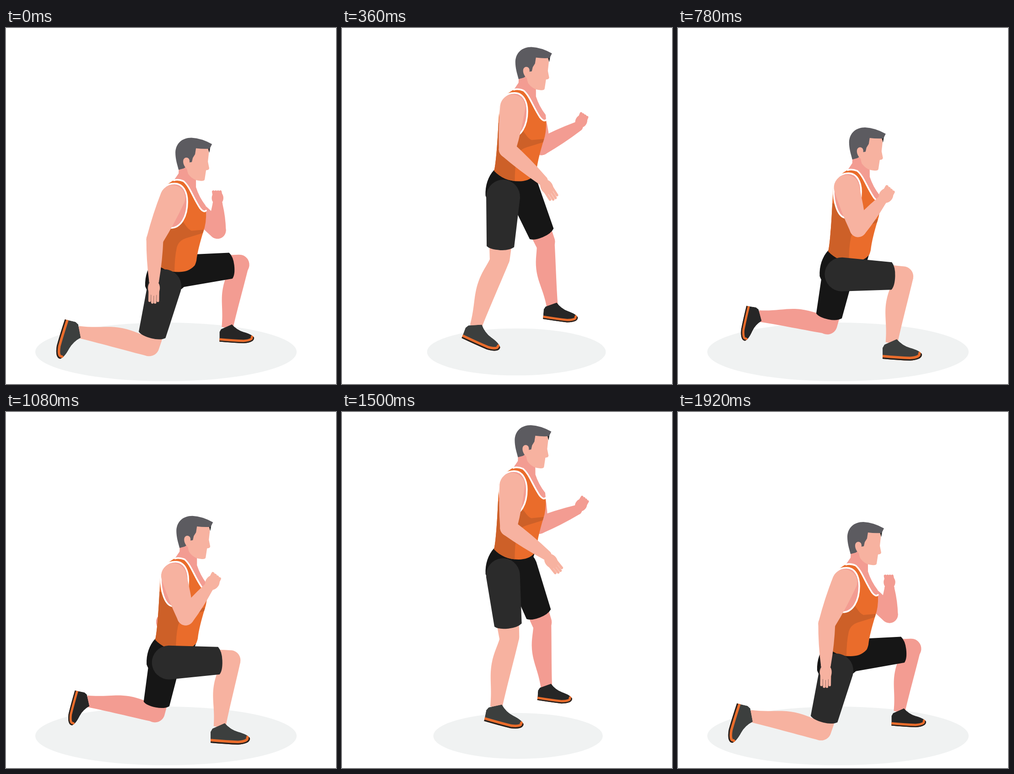
Recreate the animation shown at these times as an HTML page with a canvas. Size 721 by 777 pixels, loop 2.1 s.

```html
<!DOCTYPE html>
<html lang="en">
<head>
<meta charset="utf-8">
<title>Jumping lunges</title>
<style>
  html, body { margin: 0; width: 100%; height: 100%; overflow: hidden; background: #fff; }
  canvas { display: block; width: 721px; height: 777px; }
</style>
</head>
<body>
<canvas id="stage" width="721" height="777"></canvas>
<script>
const ctx = document.getElementById('stage').getContext('2d');
const LOOP = 2100, STEP = 60, HALF = 1020;
const { PI, sin, cos, min, max, hypot, atan2 } = Math;
const RAD = PI / 180;

const LIGHT = '#f7b2a0', PINK = '#f39c92', ORANGE = '#ea6c2b', RUST = '#cd6028';
const HAIR = '#5c5b60', BLACK = '#161616';

// Each joint moves from a low to a high point of the jump, with its leg behind or in front
const NEAR = {
  skin: LIGHT, cloth: '#2b2b2b', shoe: '#3c3f3e',
  size: 1, foot: 1, hand: 1, droop: 0.35, raise: 0, shoulder: [364, 369, 27.5],
  hip: { back: [[346, 563], [342, 565]], front: [[354, 557], [358, 574]] },
  elbow: { back: [[325, 460], [354, 461]], front: [[391, 458], [379, 466]] },
  wrist: { back: [[323, 550], [441, 532]], front: [[437, 392], [469, 460]] },
  ankle: { back: [160, 664], front: [467, 685] }
};
const FAR = {
  skin: PINK, cloth: BLACK, shoe: '#262626',
  size: 0.95, foot: 0.88, hand: 0.85, droop: 0, raise: 0.5, shoulder: [418, 395, 18],
  hip: { back: [[346, 540], [371, 571]], front: [[383, 529], [387, 546]] },
  elbow: { back: [[340, 470], [413, 459]], front: [[462, 440], [424, 457]] },
  wrist: { back: [[347, 535], [479, 516]], front: [[462, 383], [515, 408]] },
  ankle: { back: [179, 635], front: [484, 652] }
};

const SHOE = [[-20, 37], [-20, 13], [-16, 6], [11, -6], [23, 8], [40, 13], [62, 19], [66, 27], [67, 39], [40, 41], [15, 40]];
const SHIN = new Path2D('M22 0C20 40 14 110 13 148L-13 148C-16 110 -27 90 -27 60C-27 35 -20 20 -19 0Z');
const THIGH = new Path2D('M-37 0A37 37 0 0 1 37 0L30 106Q20 114 0 114Q-22 114 -30 107Z');
const PELVIS = new Path2D('M323 506C310 520 303 540 304 562Q310 580 325 582L370 577Q388 568 402 548L414 510Z');
const NECK = new Path2D('M378 294L377 316L366 332L395 347L430 399L437 397L436 386Q422 368 415 346L415 328L400 290Z');
const SHIRT = new Path2D('M335 366Q342 344 366 331Q375 327 388 333C402 345 408 368 424 393Q431 401 437 398Q438 425 431 443C424 466 418 488 416 506Q414 514 412 517C402 528 390 531 377 531C355 531 337 523 323 508C328 490 332 420 333 400Z');
const SHADE = new Path2D('M320 400L380 415C392 425 394 436 405 441L440 438L430 446L394 457Q377 462 373 478Q368 500 368 535L315 535Z');
const ARMHOLE = new Path2D('M336 372C336 350 350 338 368 338C388 338 396 358 396 378C396 410 382 435 360 435C344 432 335 400 336 372Z');
const COLLAR = new Path2D('M367 331Q376 328 388 333C402 345 408 368 424 392Q432 402 437 397');
const FACE = new Path2D('M412 258L442 260L443 272L441 290L444 305L442 308L437 309L434 329Q433 333 424 332Q408 331 398 317Q394 308 395 290Z');
const FRINGE = new Path2D('M441 260L446 260L444 271Z');
const CUT = new Path2D('M377 308C374 296 370 285 370 270C371 250 385 238 405 238Q427 239 450 252L445 262Q430 263 415 261L413 274L408 282L406 291L400 292L396 300L388 305Z');
const EAR = new Path2D('M387 290C387 278 401 279 401 289C401 296 398 301 397 308C392 304 387 297 387 290Z');

const clamp = v => max(0, min(1, v));
const ease = u => (1 - cos(PI * clamp(u))) / 2;
const mix = (a, b, k) => a + (b - a) * k;
const blend = (p, q, k) => [mix(p[0], q[0], k), mix(p[1], q[1], k)];
const angle = (a, b) => atan2(b[1] - a[1], b[0] - a[0]);
const dist = (a, b) => hypot(b[0] - a[0], b[1] - a[1]);
const polar = (p, turn, len) => [p[0] + cos(turn) * len, p[1] + sin(turn) * len];

function at([x, y], turn, draw) {
  ctx.save();
  ctx.translate(x, y);
  ctx.rotate(turn);
  draw();
  ctx.restore();
}

function fill(path, color) {
  ctx.fillStyle = color;
  ctx.fill(path);
}

function stroke(path, color, width) {
  ctx.strokeStyle = color;
  ctx.lineWidth = width;
  ctx.stroke(path);
}

// Tapered, slightly bulging limb with round ends
function limb(a, b, ra, rb, color) {
  at(a, angle(a, b), () => {
    const len = dist(a, b), bulge = (ra + rb) / 2 + 3, p = new Path2D();
    p.arc(0, 0, ra, PI / 2, PI * 1.5);
    p.quadraticCurveTo(len / 2, -bulge, len, -rb);
    p.arc(len, 0, rb, -PI / 2, PI / 2);
    p.quadraticCurveTo(len / 2, bulge, 0, ra);
    fill(p, color);
  });
}

function shoe(ankle, deg, kit) {
  // Toes curl up as the heel lifts
  const bend = clamp((deg - 45) / 30) ** 2;
  const p = SHOE.map(([x, y]) => {
    const curl = bend * max(0, x - 20) ** 2;
    return [x - 0.003 * curl, y - 0.007 * curl];
  });
  const body = new Path2D(), sole = new Path2D();
  for (const i of [0, 1, 2, 3]) body.lineTo(...p[i]);
  for (const i of [4, 6, 8]) body.quadraticCurveTo(...p[i], ...p[i + 1]);
  body.quadraticCurveTo(...p[10], ...p[0]);
  sole.moveTo(...p[7]);
  sole.quadraticCurveTo(...p[8], ...p[9]);
  sole.quadraticCurveTo(...p[10], ...p[0]);
  at(ankle, deg * RAD, () => {
    ctx.scale(kit.foot, kit.foot);
    ctx.clip(body);
    fill(body, kit.shoe);
    stroke(sole, ORANGE, 17);
    stroke(sole, '#222', 6);
  });
}

function leg(kit, pose) {
  const { joint, front, h, drop } = pose;
  const thigh = 134 * kit.size, shin = mix(156, 145, front) * kit.size;
  const hip = joint(kit.hip, front);
  const { back: b, front: f } = kit.ankle;
  const aim = blend(
    [b[0] + 195 * h ** 4, b[1] - 19 * sin(PI * h)],
    [f[0] - 0.15 * drop, f[1] - 0.45 * drop],
    front
  );

  // Two-bone reach, knee forward
  const turn = angle(hip, aim), d = min(dist(hip, aim), (thigh + shin) * 0.99);
  const ankle = polar(hip, turn, d);
  const open = Math.acos((thigh ** 2 + d ** 2 - shin ** 2) / (2 * thigh * d));
  const knee = polar(hip, turn - open, thigh);
  const shinTurn = angle(knee, ankle) - PI / 2;

  limb(polar(hip, turn - open, thigh / 2), knee, 23 * kit.size, 22, kit.skin);
  at(knee, shinTurn, () => {
    ctx.scale(kit.size, shin / 145);
    fill(SHIN, kit.skin);
  });
  shoe(ankle, mix(min(75, shinTurn / RAD + 2), 6 * h * h, front), kit);
  at(hip, turn - open - PI / 2, () => {
    ctx.scale(kit.size, 1.02);
    fill(THIGH, kit.cloth);
  });
}

function hand(fist, color) {
  const palm = new Path2D(), fingers = new Path2D();
  palm.ellipse(0, 16, mix(13, 15, fist), 17, 0, 0, 2 * PI);
  for (let i = 0; i < 4; i++) {
    const x = 6 * (i - 1.5), tip = mix(48 - 0.05 * x * x, 32, fist);
    fingers.moveTo(x, 22);
    fingers.lineTo(x + 2 * fist, tip);
  }
  fill(palm, color);
  stroke(fingers, color, mix(5.5, 7, fist));
}

function arm(kit, { joint, onTorso, front }) {
  const [x, y, radius] = kit.shoulder;
  const elbow = joint(kit.elbow, front), wrist = joint(kit.wrist, front);
  let turn = angle(elbow, wrist);
  turn += kit.droop * (1 - front) * (PI / 2 - turn);
  turn += kit.raise * front * (-PI / 2 - turn);
  limb(onTorso(x, y), elbow, radius, 18.5, kit.skin);
  limb(elbow, wrist, 18.5, 11, kit.skin);
  at(wrist, turn - PI / 2, () => {
    ctx.scale(kit.hand, kit.hand);
    hand(front, kit.skin);
  });
}

function draw(t) {
  // Two jumps per loop; the legs change places in the air
  const phase = t % HALF;
  const h = t < 2 * HALF ? min(ease((phase + 15) / 478), ease((877 - phase) / 466)) : 0;
  const swap = ease((phase - 330) / 200);
  const lead = t < HALF ? swap : t < 2 * HALF ? 1 - swap : 0;

  const body = [10 * sin(PI * h) + 6 * h, 2 - 223 * h];
  const drop = 177 * max(0, h - 0.38);
  const lean = 4 * h * lead * RAD;

  const neck = [385, 325], pivot = [neck[0] + body[0], neck[1] + body[1]];
  const onTorso = (x, y) => polar(pivot, angle(neck, [x, y]) - lean, dist(neck, [x, y]));
  const joint = (j, front) => {
    const p = blend(blend(...j.back, h), blend(...j.front, h), front);
    return [p[0] + body[0], p[1] + body[1]];
  };
  const near = { joint, onTorso, h, drop, front: lead };
  const far = { ...near, front: 1 - lead };

  ctx.fillStyle = '#fff';
  ctx.fillRect(0, 0, 721, 777);
  ctx.lineJoin = ctx.lineCap = 'round';

  const shadow = new Path2D();
  shadow.ellipse(349.5 + 0.35 * drop, 707, 285.5 - drop, 64 - 0.14 * drop, 0, 0, 2 * PI);
  fill(shadow, '#f0f2f2');

  arm(FAR, far);
  leg(FAR, far);

  at(pivot, -lean, () => {
    ctx.translate(-neck[0], -neck[1]);
    fill(PELVIS, BLACK);
    fill(NECK, PINK);
    fill(SHIRT, ORANGE);
    ctx.save();
    ctx.clip(SHIRT);
    fill(SHADE, RUST);
    ctx.restore();
    fill(ARMHOLE, PINK);
    stroke(ARMHOLE, '#fff', 3.5);
    stroke(COLLAR, '#fff', 3.5);
  });
  at(body, 0, () => {
    fill(FACE, LIGHT);
    fill(FRINGE, '#222');
    fill(CUT, HAIR);
    fill(EAR, LIGHT);
  });

  leg(NEAR, near);
  arm(NEAR, near);
}

function tick() {
  draw(Math.floor(performance.now() % LOOP / STEP) * STEP);
  requestAnimationFrame(tick);
}
tick();
</script>
</body>
</html>
```
